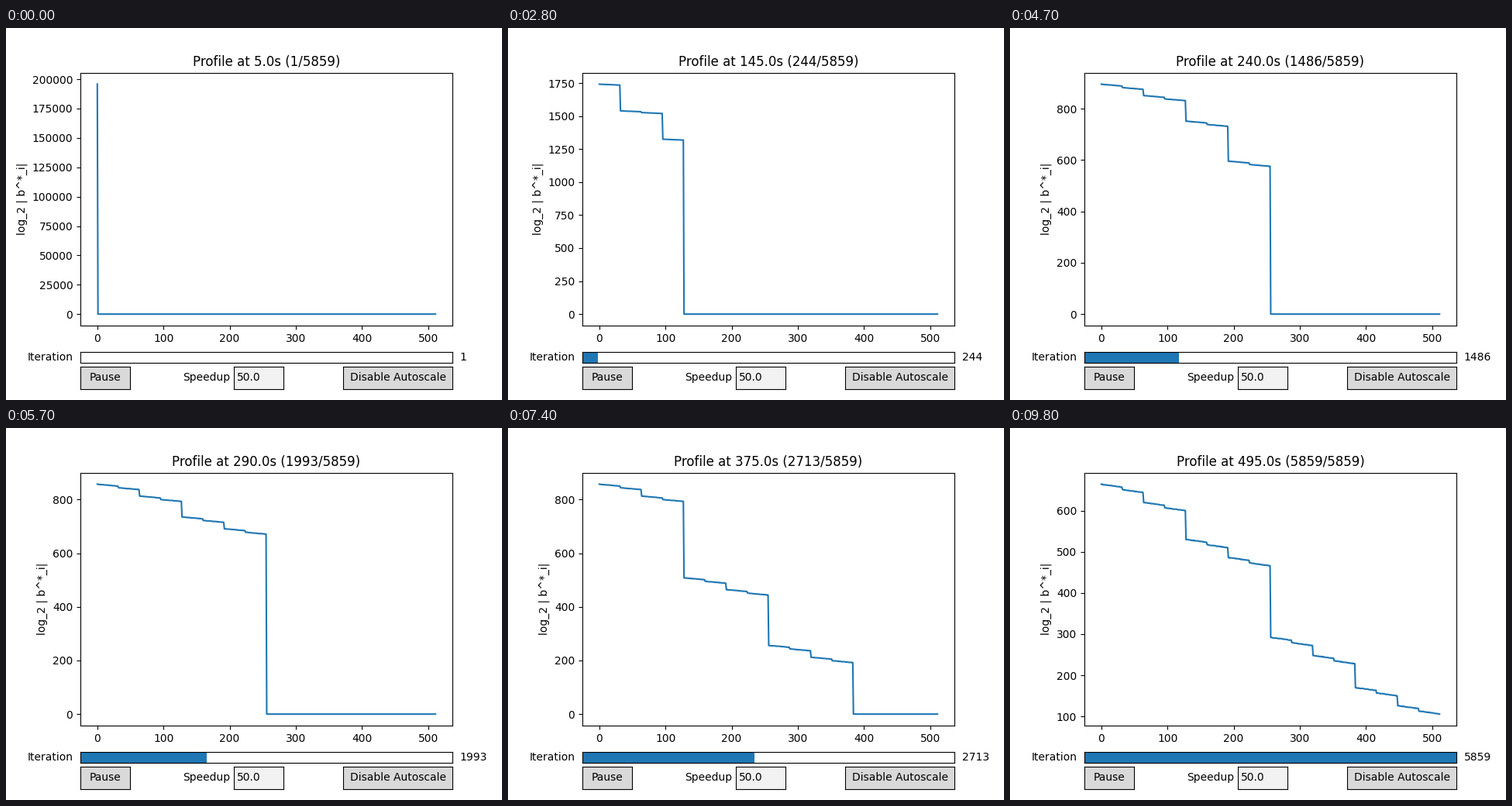
A matplotlib script for the animation above (9900 ms loop, 640x480 px).

```python
import numpy as np
import matplotlib.pyplot as plt
from matplotlib.animation import FuncAnimation

FRAMES, INTERVAL = 99, 100
DIM, TOTAL, LAST = 512, 195800, 5859
SLOPE = 7 / 32      # descent per index inside a reduced block
HALF_GAP = 13       # drop in the middle of a 64-wide block

# Log position: frame -> iteration, linear in between
LOG = [(0, 1), (10, 8), (17, 30), (20, 60), (30, 290), (40, 605), (50, 1863),
       (51, 1993), (60, 1993), (74, 2713), (86, 4404), (98, LAST)]

rough = np.random.default_rng(4).uniform(-0.6, 0.6, DIM)


def rounds(means, i, n, gap):
    """Balance four neighbouring blocks: middle, left, right, n times."""
    v, out = list(means), []
    for _ in range(n):
        for j in (i + 1, i, i + 2):
            m = (v[j] + v[j + 1]) / 2
            v[j], v[j + 1] = m + gap / 2, m - gap / 2
            out.append(list(v))
    return out


def chain(means, ops):
    """Run several balancing operations (position, rounds) on 64-wide blocks."""
    out = [list(means)]
    for i, n in ops:
        out += rounds(out[-1], i, n, 44)
    return out[1:]


def reduced(*tops):
    """Means of 64-wide blocks for 128-wide parts that start at these values."""
    return [m for t in tops for m in ((t - 10, t - 54) if t else (0, 0))]


def sized(size, states):
    return [(size, s) for s in states]


def profile(size, means):
    base = np.zeros(DIM)
    base[:size * len(means)] = np.repeat(means, size)
    k = np.arange(DIM)
    width = min(size, 32)
    shape = SLOPE * ((width - 1) / 2 - k % width)
    if size == 64:
        shape += np.where(k % 64 < 32, HALF_GAP / 2, -HALF_GAP / 2)
    if size > 1:
        shape += rough
    return np.where(base > 0, base + shape, 0)


def early_states():
    """One state per iteration while the support doubles up to 64."""
    states = [(1, [TOTAL]), (1, [TOTAL / 2] * 2)]
    m = TOTAL / 2
    for q, n in ((1, 2), (2, 2), (4, 2), (8, 2), (16, 1)):
        states += sized(q, rounds([m, m, 0, 0], 0, n, q / 4))
        m /= 2
    return states + [(8, [3311, 3294, 3107, 3090, 3027, 3024, 2820, 2818])]


def late_segments():
    """(first frame, last frame, states spread evenly between them)."""
    first = [1322.5, 1225.5, 1179, 1084.5, 421, 381.5, 266, 229]
    pairs = [(a + b) / 2 for a, b in zip(first[::2], first[1::2])] + [0] * 4
    a = reduced(857, 735, 0, 0)
    b = reduced(857, 508, 256, 0)
    c = reduced(714.5, 590, 243, 109)
    d = reduced(664, 530, 292, 170)
    to_b = chain(a, [(2, 2)])
    to_c = chain(b, [(0, 3), (4, 2), (2, 1), (0, 1), (4, 1)])
    to_d = chain(c, [(2, 3), (0, 2), (4, 2)])
    m = TOTAL / 64
    return [
        (17, 20, sized(16, rounds([3302, 3098, 3025, 2819], 0, 1, 4))),
        (20, 32, sized(32, rounds([m, m, 0, 0], 0, 5, HALF_GAP))),
        (32, 40, sized(64, rounds([m / 2 + 30, m / 2 - 30, 0, 0], 0, 1, 44))
         + [(32, first)]),
        (40, 51, sized(64, chain(pairs, [(0, 4)])[:-1] + [a])),
        (51, 60, sized(64, [a])),
        (60, 74, sized(64, to_b[:-1] + [b])),
        (74, 86, sized(64, to_c[:-1] + [c])),
        (86, 98, sized(64, to_d[:-1] + [d])),
    ]


EARLY, LATE = early_states(), late_segments()


def iteration(k):
    return int(round(np.interp(k, *zip(*LOG))))


def state(k):
    if k <= 17:
        return EARLY[iteration(k) - 1]
    for start, end, states in LATE:
        if k <= end:
            step = -(-(k - start) * len(states) // (end - start))
            return states[step - 1]


def panel(x, y, w, h, color):
    box = fig.add_axes([x, y, w, h], facecolor=color)
    box.set_xticks([])
    box.set_yticks([])
    return box


def put(box, x, text, ha):
    return box.text(x, 0.5, text, ha=ha, va="center", transform=box.transAxes)


fig, ax = plt.subplots(figsize=(6.4, 4.8), dpi=100)
fig.subplots_adjust(left=0.15, bottom=0.2, right=0.9, top=0.88)
line, = ax.plot(np.arange(DIM), np.zeros(DIM))
ax.set_ylabel("log_2 | b^*_i|")
title = ax.set_title("")

slider = panel(0.15, 0.1, 0.75, 0.03, "white")
bar = slider.axvspan(1, 2)
slider.set_xlim(1, LAST)
put(slider, -0.02, "Iteration", "right")
count = put(slider, 1.02, "", "left")

put(panel(0.15, 0.03, 0.1, 0.06, "0.85"), 0.5, "Pause", "center")
put(panel(0.68, 0.03, 0.22, 0.06, "0.85"), 0.5, "Disable Autoscale", "center")
entry = panel(0.46, 0.03, 0.1, 0.06, "0.95")
put(entry, -0.08, "Speedup", "right")
put(entry, 0.05, "50.0", "left")


def update(k):
    n = iteration(k)
    y = profile(*state(k))
    line.set_ydata(y)
    pad = 0.05 * np.ptp(y)
    ax.set_ylim(y.min() - pad, y.max() + pad)
    title.set_text(f"Profile at {5 * (k + 1):.1f}s ({n}/{LAST})")
    bar.set_width(n - 1)
    count.set_text(str(n))
    return line, title, bar, count


anim = FuncAnimation(fig, update, frames=FRAMES, interval=INTERVAL,
                     repeat=True, repeat_delay=0, blit=False)
plt.show()
```
